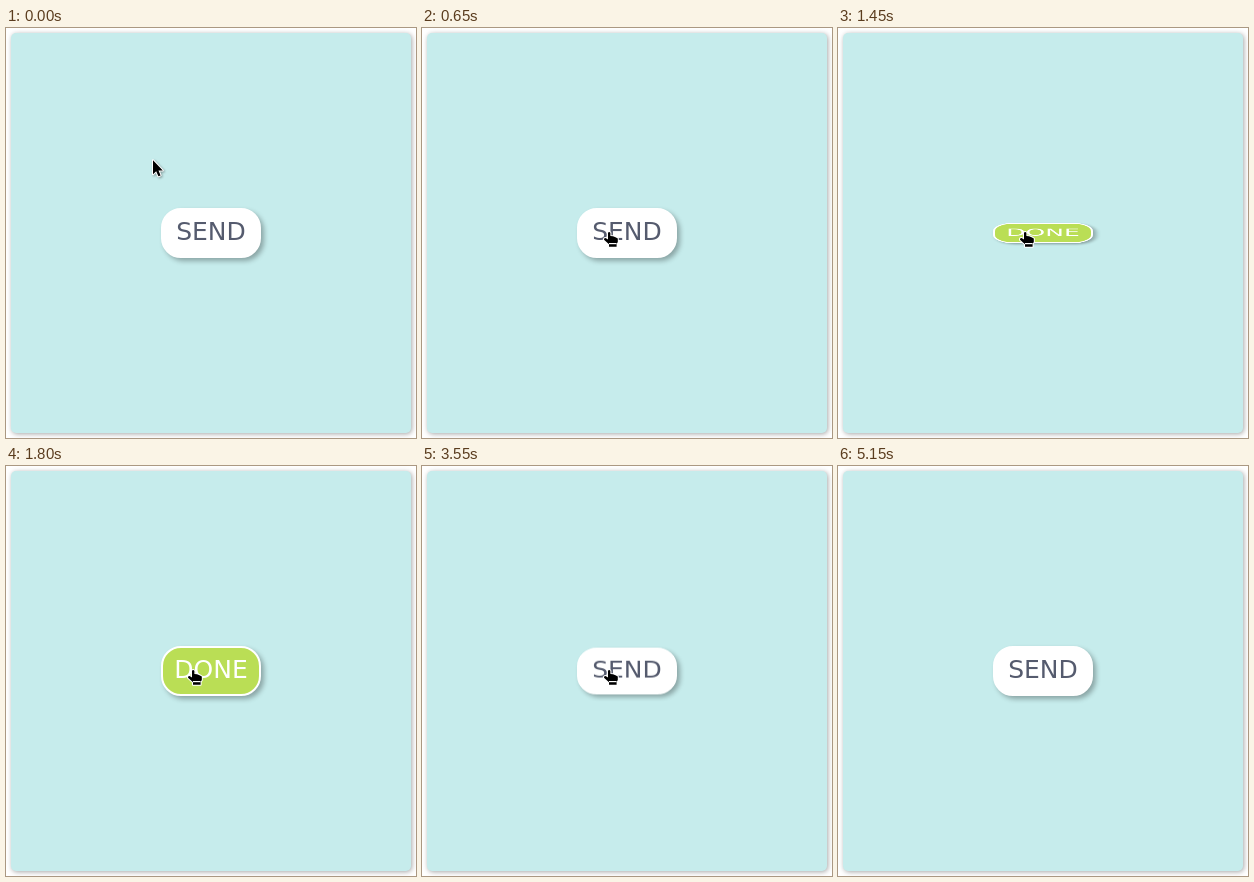
Write an HTML page that moves like this. It is 410 px wide and 410 px high and loops after 5450 ms.

```html
<!DOCTYPE html>
<html lang="en">
<head>
<meta charset="utf-8">
<title>Flip button</title>
<style>
  html, body { margin: 0; width: 100%; height: 100%; overflow: hidden; background: #fff; }
  .card {
    position: absolute; left: 5px; top: 5px; width: 400px; height: 400px;
    border-radius: 5px; background: #c6ecec;
    box-shadow: 1px 1px 5px rgba(0, 0, 0, .35);
  }
  .button {
    position: absolute; left: 155px; top: 180px; width: 100px; height: 50px;
    transform-style: preserve-3d; will-change: transform;
  }
  .face {
    position: absolute; inset: 0; box-sizing: border-box;
    border: 2px solid #fff; border-radius: 20px;
    box-shadow: 3px 3px 5px rgba(0, 0, 0, .3);
    font: 25px/43px "DejaVu Sans", sans-serif;
    text-align: center; white-space: nowrap;
    backface-visibility: hidden;
  }
  .send { background: #fff; color: #555b6e; }
  .done { background: #bade55; color: #fff; transform: rotateX(180deg); }
  .pointer {
    position: absolute; left: 0; top: 0; width: 1px; height: 1px; overflow: visible;
    stroke: #fff; stroke-width: 2; stroke-linejoin: round; paint-order: stroke;
  }
  #arrow { filter: drop-shadow(1px 1px 1px rgba(0, 0, 0, .35)); }
</style>
</head>
<body>
<div class="card"></div>
<div class="button" id="button">
  <div class="face send">SEND</div>
  <div class="face done">DONE</div>
</div>
<svg class="pointer" id="pointer">
  <path id="arrow" d="M0 1.2V15.2L3.2 12.3 5.4 17.3 7.6 16.4 5.5 11.5H9.8Z"/>
  <g id="hand">
    <path d="M0 .8Q1.2-.6 2.4 .8V4L5 4.2 7.5 5.2 9.8 6.6V10L8.6 12V14.8H1V12.2L-4 7.8Q-4.2 5.6-2 6.2L0 7.6Z"/>
    <path d="M1 11.6H8.6" stroke-width="1.2"/>
  </g>
</svg>
<script>
  const LOOP = 5450, FLIP = 600;
  const byId = id => document.getElementById(id);
  const every50 = (from, to) => Array.from({ length: (to - from) / 50 + 1 }, (_, i) => from + i * 50);

  // The picture is only refreshed at these moments.
  const ticks = [
    ...every50(0, 350), 650, ...every50(1300, 1450), 1800,
    3200, 3350, 3550, 3700, 4200, 4400, 4700, 4850, 5150
  ];

  const key = (time, transform, easing = 'linear') => ({ offset: time / LOOP, transform, easing });
  const turn = (time, angle) => key(time, `rotateX(${angle}deg)`, 'ease');
  const move = (time, x, y, easing) => key(time, `translate(${x}px, ${y}px)`, easing);

  function pausedAnimation(id, keys) {
    const animation = byId(id).animate([...keys, { ...keys.at(-1), offset: 1 }], { duration: LOOP, fill: 'both' });
    animation.pause();
    return animation;
  }

  const animations = [
    pausedAnimation('button', [
      turn(0, 0), turn(1230, 0), turn(1230 + FLIP, 180),
      turn(3190, 180), turn(3190 + FLIP, 0)
    ]),
    pausedAnimation('pointer', [
      move(0, 147, 131, 'cubic-bezier(.3, .4, .6, .9)'),
      move(350, 173, 187), move(650, 186, 204), move(3700, 186, 204),
      move(4200, 127, 124), move(4400, 99, 71), move(4700, 67, 25),
      move(4850, 51, -7), move(5150, 20, -60)
    ])
  ];

  function draw(now) {
    const time = now % LOOP;
    const tick = ticks.findLast(t => t <= time);
    const overButton = tick >= 350 && tick < 4200;
    for (const animation of animations) animation.currentTime = tick;
    byId('arrow').style.display = overButton ? 'none' : '';
    byId('hand').style.display = overButton ? '' : 'none';
  }

  const start = performance.now();
  function loop() {
    draw(performance.now() - start);
    requestAnimationFrame(loop);
  }
  loop();
</script>
</body>
</html>
```
